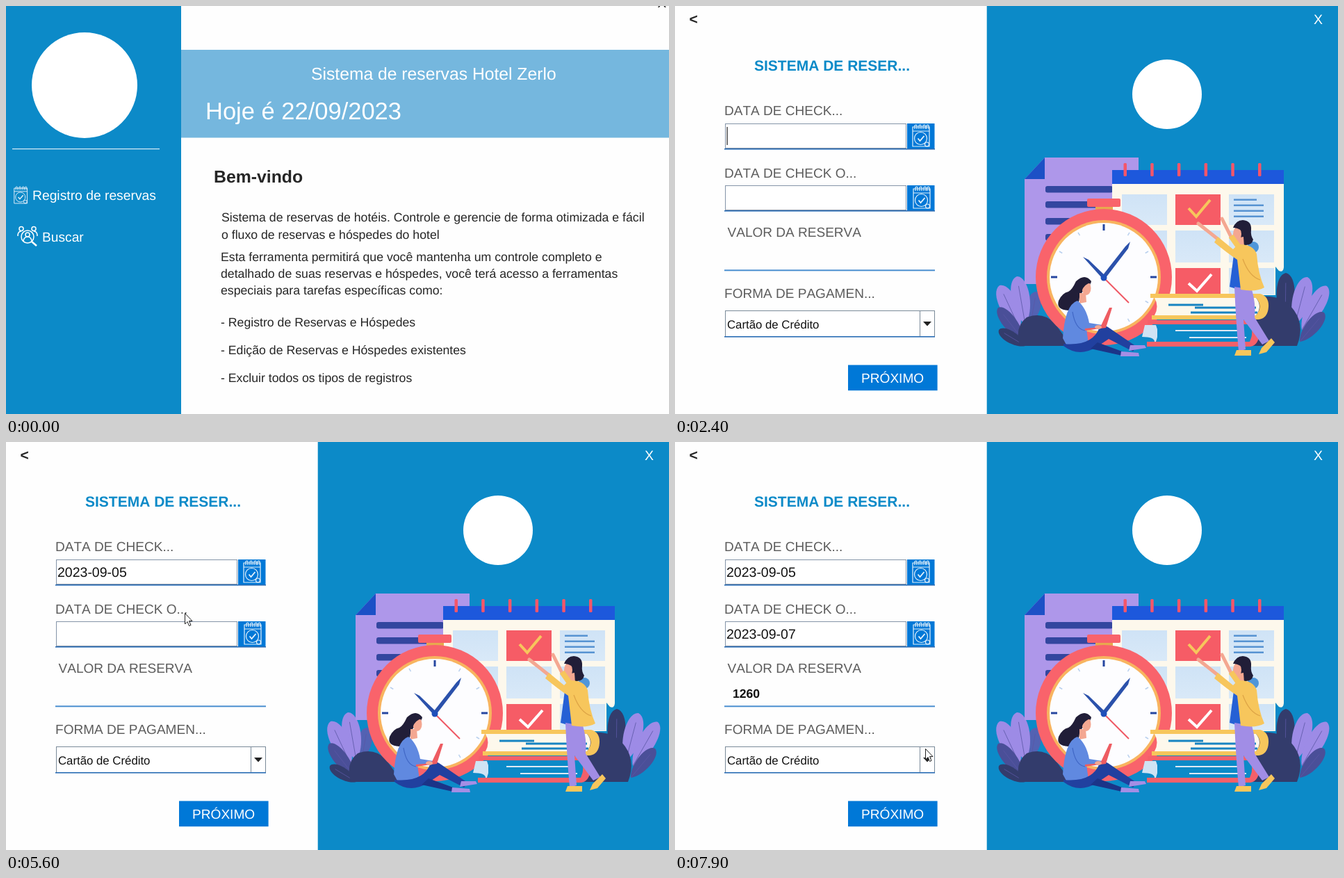
An HTML page that plays this animation: 954 px wide and 587 px high, repeating every 8000 ms.

```html
<!DOCTYPE html>
<html lang="pt">
<head>
<meta charset="utf-8">
<style>
html, body { margin: 0; width: 100%; height: 100%; overflow: hidden; background: #fff; }
svg { display: block; width: 100vw; height: 100vh; font-family: "Liberation Sans", Arial, sans-serif; font-kerning: none; text-rendering: geometricPrecision; }
</style>
</head>
<body>
<svg id="stage" viewBox="0 0 954 587"></svg>
<script>
const LOOP = 8000, STEP = 100;
const BLUE = '#0c8ac8', BTN = '#0078d7', RULE = '#4a8fd0', INK = '#262626', GREY = '#5c5c5c', NAVY = '#333c6c',
  LILAC = '#9d8be6', RED = '#f9636b', GOLD = '#f7c65c', SKIN = '#f4a791', HAIR = '#211e38', CREAM = '#fdf8ec';

const rect = (x, y, w, h, fill, more = '') => `<rect x="${x}" y="${y}" width="${w}" height="${h}" fill="${fill}" ${more}/>`;
const path = (d, fill, more = '') => `<path d="${d}" fill="${fill}" ${more}/>`;
const line = (d, stroke, w = 1, more = '') => path(d, 'none', `stroke="${stroke}" stroke-width="${w}" ${more}`);
const disc = (x, y, r, fill, ry = r) => `<ellipse cx="${x}" cy="${y}" rx="${r}" ry="${ry}" fill="${fill}"/>`;
const text = (x, y, s, size, fill = INK, more = '') => `<text x="${x}" y="${y}" font-size="${size}" fill="${fill}" ${more}>${s}</text>`;
const group = (id, body, more = '') => `<g id="${id}" ${more}>${body}</g>`;
const BOLD = 'font-weight="700"', MID = 'text-anchor="middle"', END = 'text-anchor="end"';

// Notepad with a tick, 26 x 33 units
const pad = (x, y, k) => `<g transform="translate(${x} ${y}) scale(${k})" fill="none" stroke="#e6f1fb" stroke-width="1.2">
  <path d="M1 4H25V32H1ZM1 10H25"/><path d="M4 7V2q2-2 3 0V7M10 7V2q2-2 3 0V7M16 7V2q2-2 3 0V7M21 7V2q2-2 3 0V7"/>
  <circle cx="12.500" cy="20.500" r="9"/><path d="M8.500 20.500l3 3.500 6-7" stroke-width="1.8"/><circle cx="21.500" cy="29" r="3"/></g>`;

const people = `<g fill="none" stroke="#fff" stroke-width="1.5">
  <circle cx="31" cy="332" r="9"/><path d="M37 339l7 6" stroke-width="2.5"/>
  <circle cx="31" cy="329" r="3"/><path d="M25 338q1-6 6-6t6 6"/>
  <circle cx="22" cy="320.500" r="3"/><circle cx="40" cy="320.500" r="3"/>
  <path d="M17 331q0-7 5-7M45 331q0-7-5-7"/></g>`;

function home() {
  const body = [
    [310, 310, 'Sistema de reservas de hotéis. Controle e gerencie de forma otimizada e fácil'],
    [310, 334.5, 'o fluxo de reservas e hóspedes do hotel'],
    [309, 367, 'Esta ferramenta permitirá que você mantenha um controle completo e'],
    [309, 391, 'detalhado de suas reservas e hóspedes, você terá acesso a ferramentas'],
    [309, 415, 'especiais para tarefas específicas como:'],
    [309, 461, '- Registro de Reservas e Hóspedes'],
    [309, 501, '- Edição de Reservas e Hóspedes existentes'],
    [309, 541, '- Excluir todos os tipos de registros']
  ].map(([x, y, s]) => text(x, y, s, 17.7)).join('');
  return rect(0, 0, 954, 587, '#fefefe') + rect(0, 0, 252, 587, BLUE) +
    rect(252, 63, 702, 126.5, '#75b7de') + disc(113, 114, 76, '#fff') +
    rect(9, 205, 212, 1.2, '#d9ecf7') + group('hover', rect(0, 242, 252, 58, '#75b7de')) +
    pad(11, 259, .78) + people +
    text(38, 279, 'Registro de reservas', 19.3, '#fff') + text(52, 338.5, 'Buscar', 19.2, '#fff') +
    text(439, 105.5, 'Sistema de reservas Hotel Zerlo', 24.7, '#fff') +
    text(287, 162.5, 'Hoje é 22/09/2023', 34.5, '#fff') +
    text(299, 254, 'Bem-vindo', 24.8, INK, BOLD) + text(937.5, 1.5, 'X', 19, INK) + body;
}

// Round-tipped leaf from its foot (x, y) to its tip
function leaf(x, y, tx, ty, w, fill) {
  const dx = tx - x, dy = ty - y, n = Math.hypot(dx, dy), px = -dy / n * w, py = dx / n * w;
  const at = (f, k) => `${x + dx * f + px * k} ${y + dy * f + py * k}`;
  return path(`M${x} ${y}C${at(.25, 1)} ${at(.95, 1.05)} ${tx} ${ty}C${at(.95, -1.05)} ${at(.25, -1)} ${x} ${y}`, fill) +
    line(`M${x} ${y}L${at(.8, 0)}`, '#5b57a5', .8);
}

function planner() {
  let s = path('M503 249L532 218H667V400H503Z', '#ae97ea') + path('M503 249L532 218V249Z', '#1c50c6');
  [[259, 97], [281, 97], [305, 50], [328, 20]].forEach(([y, w]) => s += rect(533, y, w, 9.5, '#33469f', 'rx="3"'));
  s += path('M629 250H876V376Q875 384 869 381L864 375V416H629Z', CREAM) + rect(629, 236, 247, 20, '#1d58dc');
  for (let i = 0; i < 6; i++) s += rect(645.5 + i * 38.7, 226, 4.5, 19, '#f4566a', 'rx="1.5"');
  for (let i = 0; i < 9; i++) {
    const c = i % 3, r = i / 3 | 0, red = c === 1 && r !== 1;
    s += rect(643 + c * 77, [271, 323, 377][r], 65, [44, 46, 38][r], red ? '#f65c66' : 'url(#sky)');
  }
  for (let i = 0; i < 4; i++) s += rect(804, 277.5 + i * 8, i ? 43 : 33, 2.5, '#5793d2');
  return s + line('M739 291l11 12 20-24', GOLD, 4) + line('M739 399l12 11 21-24', '#fff', 4);
}

function clock() {
  let s = rect(605, 286, 25, 10, '#e8a94e') + rect(593, 277, 48, 12, RED, 'rx="2"') +
    disc(617, 390, 98, RED) + disc(617, 390, 82, '#f8b45f') + disc(617, 390, 78, '#fdfdff');
  for (let i = 0; i < 12; i++) {
    const big = i % 3 === 0;
    s += line(`M617 ${big ? 314 : 316}v${big ? 9 : 5}`, big ? '#2647a0' : '#b9d0ee', big ? 3 : 1.5, `transform="rotate(${i * 30} 617 390)"`);
  }
  return s + line('M617 391L653 427', '#ef5864', 2) + path('M615 392L587 361 595 365 619 388Z', '#2b51ab') +
    path('M615 388L648 346 655 339 652 349 619 392Z', '#2b51ab') + disc(617, 391, 4.5, '#1f4fba');
}

const books = path('M684 414H842Q855 418 854 433Q853 449 840 451H686V445H836Q847 432 836 420H684Z', GOLD) +
  path('M690 420H836Q846 432 836 445H690Q697 432 690 420Z', CREAM) +
  line('M710 430H760M748 434H836M742 441H838', '#1784c2', 3) +
  path('M680 452H832Q842 458 841 470Q840 488 828 490H679V483H826Q834 469 826 458H680Z', '#f4606a') +
  path('M676 459H694V483H690Q690 476 672 476Z', '#cfe3f4') +
  path('M692 459H828Q833 470 827 483H692Q697 470 692 459Z', BLUE) +
  line('M720 467H812M740 477H822', '#dfeaf5', 2);

const sitter = path('M577 396q13-12 22 0l-3 8q-10 4-14 15q-1 18-16 19q-18-1-14-14q5-11 14-13q5-2 11-15z', HAIR) +
  disc(592, 406, 6.5, SKIN, 10) + path('M582 413l9 0 1 13-10 2z', SKIN) + path('M578 398q10-12 21 0q-11 2-14 13z', HAIR) +
  path('M579 424q-18 6-21 54l7 13 30-5-3-22 22 1 1-6-19-3q-4-22-17-32z', '#6089e0') +
  line('M572 440q4 25 18 27', '#3f66c4', 1.2) +
  path('M559 486q42 4 52-24q6-5 15 2l38 26-5 7-35-18-18 12q-25 15-47-2z', '#21409f') +
  path('M608 484l38 14-3 5-45-10z', '#1b3488') +
  path('M655 488l21 0 2 4-25 4z', '#a48ee5') + path('M642 497l25 2 1 5h-27z', '#a48ee5') +
  path('M612 462l13-28h4l-9 29-30 4v-3z', '#ee5c62') + disc(609, 462, 5, SKIN, 3);

const stander = disc(832, 347, 8, '#4f96d9') +
  line('M800 332L787 306', SKIN, 5, 'stroke-linecap="round"') + line('M782 336L753 313', SKIN, 5, 'stroke-linecap="round"') +
  path('M806 318q1-10 11-10q13 1 12 14q-1 8 3 14q-2 9-13 8q-9 0-10-8z', HAIR) +
  path('M808 334l10-2 1 14-10 1z', SKIN) + disc(809, 328, 6, SKIN, 9.5) + path('M803 319q4-11 15-10l-2 15q-6-5-13-5z', HAIR) +
  path('M804 358l-6 46 20 6-4-48z', '#2560d5') +
  path('M805 404l25 4q6 20 4 40l21 34-10 5-27-36 3 43-10 3q-4-45-6-93z', '#a18de6') +
  path('M810 343q22-1 27 14q2 28 11 48q-12 7-34 3l-5-43q-15-10-33-25l5-8 22 18z', GOLD) +
  line('M817 364q9 25 25 30', '#dda345', 1.2) + line('M812 348l-12-17', GOLD, 8) +
  path('M808 495h21v8h-24z', GOLD) + path('M844 492l14-14 5 6-12 14-11 3z', GOLD);

function scene() {
  return leaf(512, 455, 520, 411, 13, '#5362b3') + leaf(504, 458, 492, 389, 17, LILAC) + leaf(496, 464, 467, 402, 17, LILAC) +
    leaf(502, 482, 465, 434, 13, '#4a4f98') + leaf(504, 489, 466, 466, 11, NAVY) +
    leaf(878, 456, 879, 384, 17, NAVY) + leaf(892, 458, 910, 390, 17, LILAC) + leaf(902, 466, 938, 403, 16, LILAC) +
    leaf(899, 483, 934, 441, 13, '#4a4f98') +
    planner() + path('M496 489q-8-27 10-41q23-9 40 8l24 33z', NAVY) +
    path('M830 489V420q38-8 56 12q22 24 9 57z', NAVY) + clock() + books + sitter + stander;
}

const field = y => rect(72.5, y + .5, 260, 35, '#fff', 'stroke="#8494a8"') + rect(334, y, 39.5, 36, BTN) +
  rect(71, y + 36, 303, 1.6, '#2a6db5');

const pressed = y => rect(334.5, y + .5, 38.5, 35, '#b8cfe5', 'stroke="#7a8a99"');

function form() {
  const label = (x, y, s) => text(x, y, s, 19.05, GREY);
  return rect(0, 0, 954, 587, '#fefefe') + rect(448.7, 0, 505.3, 587, BLUE) +
    text(20.5, 26, '&lt;', 21, INK, BOLD) + text(919, 26, 'X', 19.5, '#fff') +
    text(114, 93, 'SISTEMA DE RESER...', 21, BLUE, BOLD) +
    label(71, 157, 'DATA DE CHECK...') + label(71, 246.5, 'DATA DE CHECK O...') +
    label(75.5, 332, 'VALOR DA RESERVA') + label(71, 420, 'FORMA DE PAGAMEN...') +
    field(169) + field(258) + group('press1', pressed(169)) + group('press2', pressed(258)) +
    pad(341, 170, 1) + pad(342, 259, 1) +
    text(74, 193.5, '2023-09-05', 19.5, '#111', 'id="in"') + text(74, 283, '2023-09-07', 19.5, '#111', 'id="out"') +
    group('caret1', rect(74.5, 174, 1.2, 26, '#222')) + group('caret2', rect(175.5, 174, 1.2, 26, '#222')) +
    text(83, 368, '1260', 17.6, '#111', 'id="price" ' + BOLD) + rect(71, 379.3, 303, 2, RULE) +
    rect(72.5, 438.5, 301, 37, '#fff', 'stroke="#7a8a99"') + line('M352.500 439V475', '#7a8a99') +
    path('M357 454h12l-6 6.500z', '#222') + rect(71, 475, 303, 1.6, '#2a6db5') +
    text(75, 463.5, 'Cartão de Crédito', 16.8, '#111') +
    rect(249, 516.5, 128.6, 36.7, BTN) + text(268, 542, 'PRÓXIMO', 19.1, '#fff') +
    disc(708, 127, 50, '#fff') + scene();
}

const spinner = x => rect(x + .5, 208.5, 15, 10, '#eee', 'stroke="#a5b0ba"') + rect(x + .5, 218.5, 15, 10, '#eee', 'stroke="#a5b0ba"') +
  path(`M${x + 6} 215h5l-2.500-3zM${x + 6} 222h5l-2.500 3z`, '#555');

function popup() {
  const PX = 47.2, PY = 31.3;
  let s = rect(14, 206.5, 360, 244, '#eee', 'stroke="#7d97c2"') +
    rect(14.5, 230, 359, 32, '#d2e4ee') + rect(14.5, 262, 28.5, 156, '#d2e4ee') + rect(43, 262, 330, 156, '#eee') +
    rect(15.5, 208.5, 111, 20, '#eee', 'stroke="#8b9aa8"') + rect(107.5, 208.5, 19, 20, 'url(#cell)', 'stroke="#7a8a99"') +
    path('M112 217h11l-5.500 5.500z', '#222') + spinner(128) +
    rect(146.5, 208.5, 211, 20, '#fff', 'stroke="#8b9aa8"') + spinner(357) +
    text(17, 225.5, 'setembro', 19.2) + text(355, 226, '2023', 19.7, INK, END);
  ['dom', 'seg', 'ter', 'qua', 'qui', 'sex', 'sáb'].forEach((d, i) =>
    s += text(66.5 + i * PX, 252, d + '.', 18.2, i ? '#0b5aa4' : '#b01018', MID));
  for (let r = 0; r < 5; r++) s += text(40, 283.5 + r * PY, 35 + r, 19.2, '#6a6f74', END);
  for (let d = 1; d <= 30; d++) {
    const i = d + 4, x = 43 + i % 7 * PX, y = 262 + (i / 7 | 0) * PY, now = d === 22;
    s += rect(x + .5, y + .5, PX - 1.4, PY - 1.4, now ? '#999' : 'url(#cell)', `id="day${d}" stroke="#8396aa"`) +
      text(x + 23.5, y + 21.7, d, 19.2, now ? '#b01018' : INK, MID);
  }
  return s;
}

const arrow = path('M.500 .500V16L4 12.500 6.500 18.500 9 17.500 6.500 11.500H11Z', '#fff', 'stroke="#222"');
const hand = path('M4.500 12V2Q4.500 .500 6 .500T7.500 2V8Q9.500 6.500 10.500 8.500Q12.500 8 13 10Q15 10 15 12V16Q14.500 19 13 21.500H6Q4 17 .700 13.500Q.500 10.500 4.500 12Z', '#fff', 'stroke="#222"');

const stage = document.getElementById('stage');
stage.innerHTML = `<defs>
  <linearGradient id="cell" x2="0" y2="1"><stop stop-color="#e4edf6"/><stop offset=".3" stop-color="#fff"/><stop offset=".45" stop-color="#f6f9fc"/><stop offset="1" stop-color="#b8cfe5"/></linearGradient>
  <linearGradient id="sky" x2="0" y2="1"><stop stop-color="#cfe3f6"/><stop offset="1" stop-color="#d9e9f8"/></linearGradient></defs>` +
  group('home', home()) + group('form', form()) + group('popup', popup()) +
  group('mouse', group('arrow', arrow) + group('hand', hand));

const $ = id => document.getElementById(id);
const show = (id, on) => $(id).setAttribute('display', on ? 'inline' : 'none');

// Pointer track: time, x, y
const track = [
  [200, 150, 24], [500, 142, 258], [600, 140, 284], [800, 142, 205], [1500, 142, 205], [1600, 132, 256],
  [1900, 122, 283], [2000, 122, 283], [2200, 117, 279], [2600, 117, 279],
  [2700, 372, 238], [3100, 362, 200], [3200, 362, 200], [3700, 355, 188], [3900, 355, 188],
  [4100, 222, 267], [4300, 154, 316], [4400, 154, 316], [4700, 160, 303], [5000, 160, 302],
  [5300, 163, 220], [5400, 163, 220], [5800, 350, 272], [5900, 350, 275], [6100, 300, 325], [6200, 300, 325],
  [6300, 205, 381], [6500, 240, 398], [7100, 243, 388], [7200, 197, 391], [7300, 197, 391],
  [7400, 140, 415], [7500, 134, 440], [7600, 190, 455], [7900, 360, 441], [8000, 360, 441]
];

function pointer(t) {
  const i = Math.max(1, track.findIndex(p => p[0] >= t));
  const [a, b] = [track[i - 1], track[i]], k = Math.max(0, (t - a[0]) / (b[0] - a[0]));
  return [a[1] + (b[1] - a[1]) * k, a[2] + (b[2] - a[2]) * k];
}

function render(ms) {
  const t = Math.floor(ms % LOOP / STEP) * STEP, within = (a, b) => t >= a && t < b;
  const [x, y] = pointer(t), first = t < 2400, over = first && t >= 200 && y >= 242 && y < 300;
  const open1 = within(3900, 4900), open2 = within(5900, 7000);
  show('home', first);
  show('form', !first);
  show('hover', over);
  show('press1', within(3700, 3900));
  show('press2', within(5800, 5900));
  show('caret1', within(2400, 2900) || within(3400, 3900));
  show('caret2', within(4900, 5200) || within(7000, 7500));
  show('in', t >= 4900);
  show('out', t >= 7000);
  show('price', t >= 7000);
  show('popup', open1 || open2);
  $('popup').setAttribute('transform', open2 ? 'translate(1 89)' : '');
  $('day5').setAttribute('fill', within(4600, 4900) ? '#b8cfe5' : 'url(#cell)');
  $('day7').setAttribute('fill', within(6900, 7000) ? '#b8cfe5' : 'url(#cell)');
  show('mouse', within(200, 2400) || t >= 2700);
  show('hand', over);
  show('arrow', !over);
  $('mouse').setAttribute('transform', `translate(${Math.round(x)} ${Math.round(y)})`);
}

const start = performance.now();
function tick() {
  render(performance.now() - start);
  requestAnimationFrame(tick);
}
tick();
</script>
</body>
</html>
```
